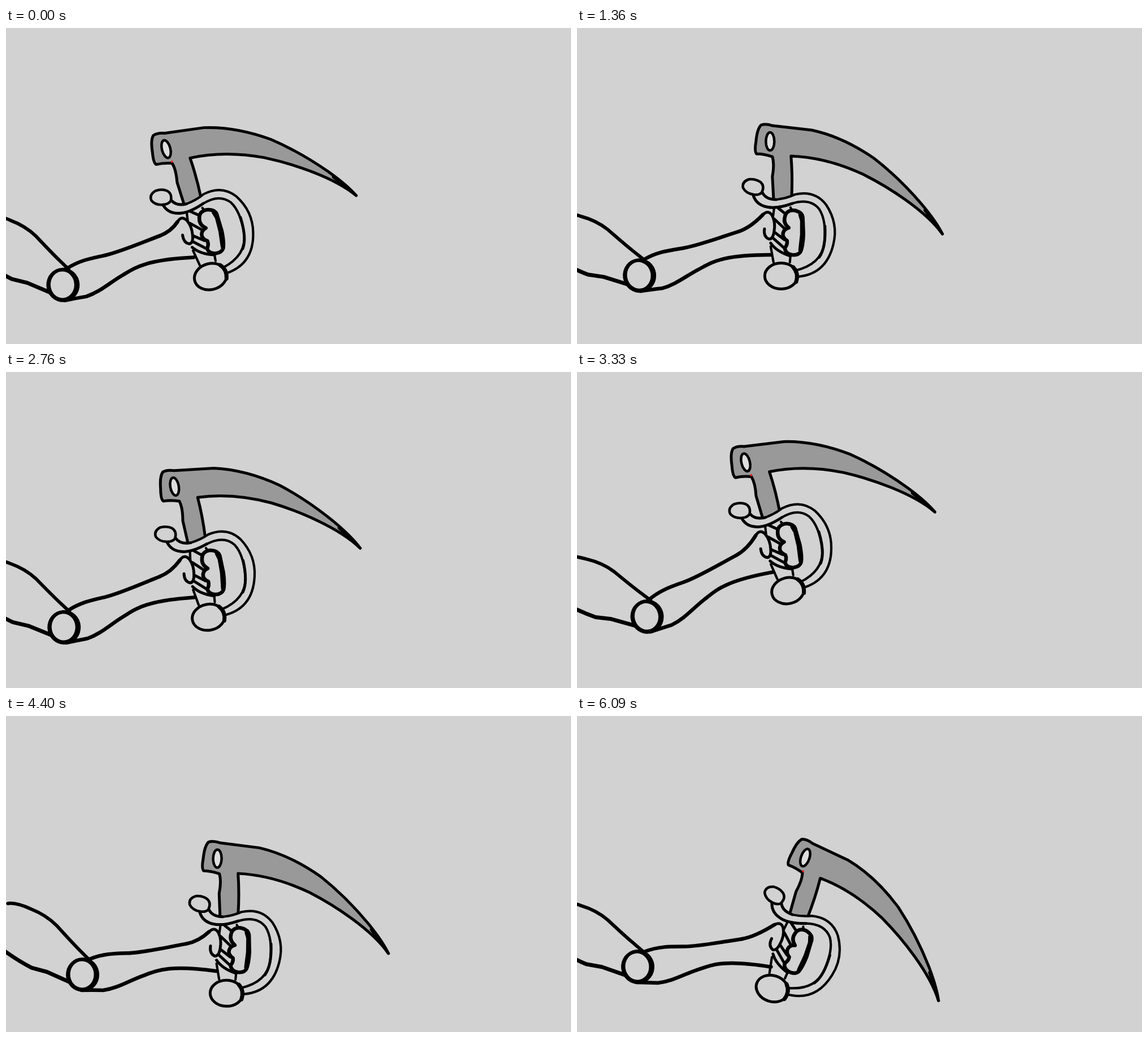
An HTML page that plays this animation: 1000 px wide and 560 px high, repeating every 6190 ms.

```html
<!DOCTYPE html>
<html lang="en">
<head>
<meta charset="utf-8">
<title>Sickle swing</title>
<style>
  html, body { margin: 0; width: 100%; height: 100%; overflow: hidden; background: #d2d2d2; }
  svg { display: block; width: 100%; height: 100%; }
  path, ellipse { stroke: #000; stroke-width: 5; stroke-linecap: round; stroke-linejoin: round; fill: none; }
  .skin { fill: #d2d2d2; }
  .thin { stroke-width: 4.2; }
  .bold { stroke-width: 6.5; }
  .heavy { stroke-width: 8; }
</style>
</head>
<body>
<svg viewBox="0 0 1000 560">
  <g id="weapon">
    <path style="fill:#999" d="M347 300L345 262Q349 240 345 227Q330 222 317 222Q313 218 316 200Q318 178 325 171Q333 168 345 172L415 180Q470 192 525 230Q570 265 610 312Q635 342 646 364Q625 335 580 303Q545 278 505 258Q440 228 378 226Q381 262 379 300"/>
    <path d="M615 322L646 364"/>
    <ellipse cx="341" cy="200" rx="7.5" ry="16" style="fill:#dedede;stroke-width:4.5"/>
    <rect id="speck" x="343.5" y="222.5" width="3.5" height="3.5" fill="#e02020"/>
    <path class="skin thin" d="M327 290Q333 303 352 303Q370 301 385 294Q420 286 440 312Q462 345 453 382Q440 438 385 440L385 429Q432 418 437 380Q441 340 428 320Q412 300 380 310Q352 320 335 316Q316 312 311 295"/>
    <path d="M311 295Q316 312 335 316Q352 320 380 310M327 290Q333 303 352 303M438 350Q440 388 428 405"/>
    <path class="skin" style="stroke-width:4.5" d="M326 291Q332 279 324 272Q316 266 304 267Q291 271 293 282Q298 292 311 294Q320 296 326 291Z"/>
    <path class="thin" d="M348 319L346 334M377 317L380 323M342 386L347 414M377 402L376 414"/>
    <path d="M355 318L369 329M349 338L366 354M349 361L366 374M342 380Q352 395 377 403M346 371L365 388"/>
    <path class="skin bold" d="M372 325Q381 319 392 325Q400 329 399 340L400 365Q399 386 395 395Q391 402 380 401Q368 399 367 389Q372 383 371 376Q362 370 364 362Q366 355 374 353Q364 345 367 334Q368 328 372 325Z"/>
    <path class="heavy" d="M395 330L398 340L398 365L395 392"/>
    <ellipse class="skin" cx="360.5" cy="438.5" rx="29" ry="23"/>
    <path style="stroke-width:7" d="M382 423Q392 434 387 449"/>
    <path d="M328 330Q338 320 345 332Q351 344 348 360Q346 373 339 373Q329 369 331 355"/>
  </g>
  <g id="forearm">
    <path class="bold" d="M118 410C140 397 160 394 185 390S242 374 285 360"/>
    <path class="bold" d="M112 466Q133 463 150 461C175 454 192 439 215 427S255 401 343 401"/>
  </g>
  <path id="wrist" class="bold"/>
  <g id="upper">
    <path style="stroke-width:6" d="M167 335Q181 333 208 346Q234 357 252 376Q276 404 290 419L307 437"/>
    <path class="heavy" d="M106 365Q118 385 133 398"/>
    <path style="stroke-width:7" d="M106 365Q118 385 133 398Q170 430 206 450L233 458L275 478"/>
    <ellipse cx="296" cy="464.5" rx="29.5" ry="30.5" style="fill:#000;stroke:none"/>
    <ellipse class="skin" cx="295" cy="464" rx="21" ry="23.5" style="stroke:none"/>
  </g>
</svg>
<script>
const LOOP = 6190;
const SHOULDER_Y = 347;

// Poses: shoulder x, upper arm, forearm and weapon angles in degrees
const low = [-65, -2.5, -11.8, -19.3];
const rise = [-65, -3.5, -12.8, -14.7];
const high = [-65, -8.1, -14.8, -12.4];
const tilt = [-65, -8.1, -8.8, -4.8];
const droop = [-65, -6.2, 0.2, 14];
const raised = [109, -35, -88.7, -108.6];
const struck = [136.5, 0.8, 40.5, 64.5];

const keys = [
  [0, low], [60, low], [240, rise], [680, high], [800, [-65, -8.4, -14.6, -11.3]],
  [1210, tilt], [1360, tilt], [1955, raised], [1985, raised], [2160, struck], [2195, struck],
  [2600, [-65, -1.2, -11.4, -22]], [2760, rise], [3150, high], [3240, high],
  [3840, raised], [3900, raised], [4075, struck], [4110, struck],
  [4510, low], [4640, rise], [5010, high], [5110, [-65, -8.4, -14.8, -11]],
  [5450, tilt], [5780, [-65, -7.2, -3.4, 6.5]], [6090, droop], [LOOP, droop]
];

const slope = (i, c) =>
  i < 0 || i >= keys.length - 1 ? 0 : (keys[i + 1][1][c] - keys[i][1][c]) / (keys[i + 1][0] - keys[i][0]);

// Monotone tangent: flat at turning points and holds
function tangent(i, c) {
  const a = slope(i - 1, c), b = slope(i, c);
  return a * b > 0 ? 2 * a * b / (a + b) : 0;
}

function poseAt(t) {
  let i = 0;
  while (i < keys.length - 2 && t >= keys[i + 1][0]) i++;
  const [t0, from] = keys[i], [t1, to] = keys[i + 1];
  const span = t1 - t0, u = (t - t0) / span, v = 1 - u;
  return from.map((p, c) =>
    p * v * v * (1 + 2 * u) + to[c] * u * u * (1 + 2 * v) +
    span * u * v * (v * tangent(i, c) - u * tangent(i + 1, c)));
}

// A part drawn around a pivot, placed elsewhere and turned
function place(pivot, at, deg) {
  const r = deg * Math.PI / 180, cos = Math.cos(r), sin = Math.sin(r);
  return {
    transform: `translate(${at}) rotate(${deg}) translate(${-pivot[0]} ${-pivot[1]})`,
    point(x, y) {
      const dx = x - pivot[0], dy = y - pivot[1];
      return [at[0] + dx * cos - dy * sin, at[1] + dx * sin + dy * cos];
    }
  };
}

const el = id => document.getElementById(id);
const parts = { upper: el('upper'), forearm: el('forearm'), weapon: el('weapon') };
const wrist = el('wrist'), speck = el('speck');

function draw(t) {
  const [x, upperDeg, foreDeg, weaponDeg] = poseAt(t);
  const upper = place([135, 349], [x, SHOULDER_Y], upperDeg);
  const forearm = place([110, 438], upper.point(296, 464), foreDeg + 9);
  const weapon = place([356, 383.5], forearm.point(356, 383.5), weaponDeg + 4.8);
  parts.upper.setAttribute('transform', upper.transform);
  parts.forearm.setAttribute('transform', forearm.transform);
  parts.weapon.setAttribute('transform', weapon.transform);
  wrist.setAttribute('d', `M${forearm.point(285, 360)}Q${forearm.point(306, 353)} ${weapon.point(328, 330)}`);
  speck.setAttribute('visibility', weaponDeg < -16 || weaponDeg > 0 ? 'visible' : 'hidden');
}

const start = performance.now();
function tick() {
  draw((performance.now() - start) % LOOP);
  requestAnimationFrame(tick);
}
tick();
</script>
</body>
</html>
```
